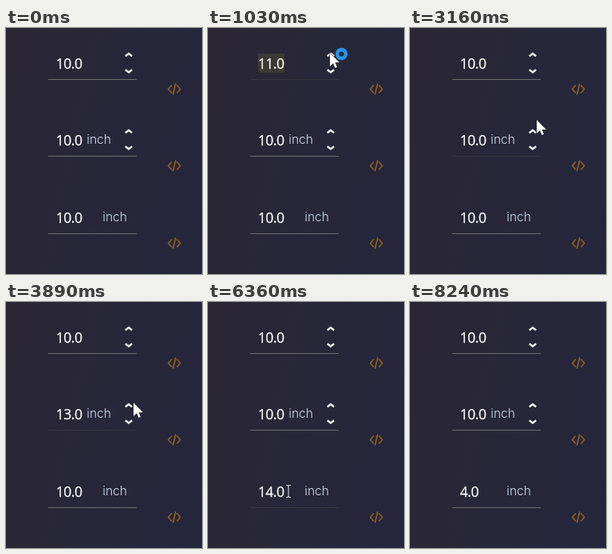
An HTML page for the animation above (8310 ms loop, 246 by 308 pixels).

```html
<!DOCTYPE html>
<html lang="en">
<head>
<meta charset="utf-8">
<title>Number fields</title>
<style>
  html, body { margin: 0; width: 100%; height: 100%; overflow: hidden; background: #282739; }
  svg { display: block; width: 246px; height: 308px;
        background: linear-gradient(102deg, #2a2634, #282739 50%, #25253d); }
  .value { font: 17.5px "Open Sans", "Noto Sans", sans-serif; letter-spacing: -.5px;
           fill: #fff; stroke: #fff; stroke-width: .25; }
  .unit { font: 300 15.6px Inter, sans-serif; fill: #cfdff2; }
  .spin { fill: none; stroke: #f4f4f6; stroke-width: 2.4; }
  .code { fill: none; stroke: #8a5e22; stroke-width: 1.8; }
</style>
</head>
<body>
<svg viewBox="0 0 246 308" xmlns="http://www.w3.org/2000/svg">
  <g id="fields"></g>
  <g id="pointer">
    <circle id="press" r="15" fill="#ffff00" fill-opacity=".4"/>
    <path id="arrow" d="M0 0V17L4 13.3L6.5 19L9 18L6.6 12.3H12Z" fill="#fff" stroke="#111" paint-order="stroke"/>
    <circle id="busy" cx="14.5" cy="1.5" r="5.4" fill="none" stroke="#2494ea" stroke-width="4.6"/>
    <path id="beam" d="M-3 -7.5H-1L0 -6.5L1 -7.5H3M0 -6.5V6.5M-3 7.5H-1L0 6.5L1 7.5H3" fill="none" stroke="#d8d8dc" stroke-width="1.1"/>
  </g>
</svg>
<script>
const LOOP = 8310, PITCH = 96.5, RESET = 10;
const ENTER = 100, LEAVE = 8240;
const $ = id => document.getElementById(id);
const lineY = i => Math.floor(64 + PITCH * i) + .5;
const UNIT_X = [null, 102, 122];

// Pointer moves: start, end and the place reached
const entry = { x: 212, y: 261 };
const moves = [
  { from: ENTER, to: 880, x: 153, y: 31 },
  { from: 1430, to: 1820, x: 153, y: 53 },
  { from: 2950, to: 3400, x: 160, y: 126 },
  { from: 4150, to: 4350, x: 153, y: 149 },
  { from: 5060, to: 5500, x: 101, y: 237 },
  { from: 7860, to: LEAVE, x: 199, y: 308 }
];

// Evenly spaced steps of +1 or -1: field, sign, count, first and last time
const steps = (field, sign, count, first, last) =>
  Array.from({ length: count }, (_, i) =>
    ({ field, sign, at: first + (last - first) * i / (count - 1) }));

const clicks = [
  steps(0, 1, 2, 940, 1360), steps(0, -1, 2, 2020, 2420),
  steps(1, 1, 3, 3430, 3820), steps(1, -1, 3, 4370, 4760)
].flat();
const wheel = [
  steps(2, 1, 3, 5960, 6060), steps(2, 1, 3, 6360, 6490),
  steps(2, -1, 5, 6750, 6910), steps(2, -1, 3, 7140, 7200),
  steps(2, -1, 4, 7500, 7660)
].flat();
const changes = [...clicks, ...wheel];

const chevron = (y, rise) =>
  `<path class="spin" d="M149.8 ${y}l4.2 ${-rise}l4.2 ${rise}"/>`;
const codeIcon = y =>
  `<path class="code" d="M208 ${y - 5}l-4.2 5l4.2 5M213 ${y - 7}l-3.5 14M214.5 ${y - 5}l4.2 5l-4.2 5"/>`;

function fieldMarkup(unitX, i) {
  const y = lineY(i);
  return `<path id="line${i}" d="M53 ${y}H164"/>
    <text id="value${i}" class="value" x="62.8" y="${y - 13.5}"></text>
    ${unitX ? `<text class="unit" x="${unitX - .7}" y="${y - 15.5}">inch</text>` : ''}
    ${i < 2 ? chevron(y - 29.3, 3.2) + chevron(y - 12.2, -3.2) : ''}
    ${codeIcon(y + 12)}`;
}

$('fields').innerHTML =
  `<rect id="selection" x="63" y="32" width="33" height="24" fill="#3b3a34"/>` +
  UNIT_X.map(fieldMarkup).join('');

const easeOut = k => 1 - (1 - k) ** 3;

function pointerAt(t) {
  return moves.reduce((p, { from, to, x, y }) => {
    const k = easeOut(Math.min(1, Math.max(0, (t - from) / (to - from))));
    return { x: p.x + (x - p.x) * k, y: p.y + (y - p.y) * k };
  }, entry);
}

function valueAt(field, t) {
  return changes.reduce((v, c) => c.field === field && c.at <= t ? v + c.sign : v, RESET);
}

function show(id, on) {
  $(id).style.display = on ? '' : 'none';
}

function draw(t) {
  const { x, y } = pointerAt(t);
  const visible = t >= ENTER && t < LEAVE;
  const hovered = UNIT_X.findIndex((_, i) =>
    visible && x >= 53 && x <= 164 && y <= lineY(i) && y > lineY(i) - 46);

  UNIT_X.forEach((_, i) => {
    $('value' + i).textContent = valueAt(i, t).toFixed(1);
    $('line' + i).setAttribute('stroke', i === hovered ? '#383640' : '#706e70');
  });

  const typing = hovered === 2 && x < 120;
  const sinceClick = t - clicks[0].at;
  show('pointer', visible);
  show('arrow', !typing);
  show('beam', typing);
  show('busy', sinceClick >= 60 && sinceClick < 160);
  show('selection', sinceClick >= 30 && sinceClick < 190);
  show('press', clicks.some(({ at }) => t >= at && t < at + 70));
  $('pointer').setAttribute('transform', `translate(${Math.round(x)} ${Math.round(y)})`);
}

const begin = performance.now();
function frame() {
  draw((performance.now() - begin) % LOOP);
  requestAnimationFrame(frame);
}
frame();
</script>
</body>
</html>
```
